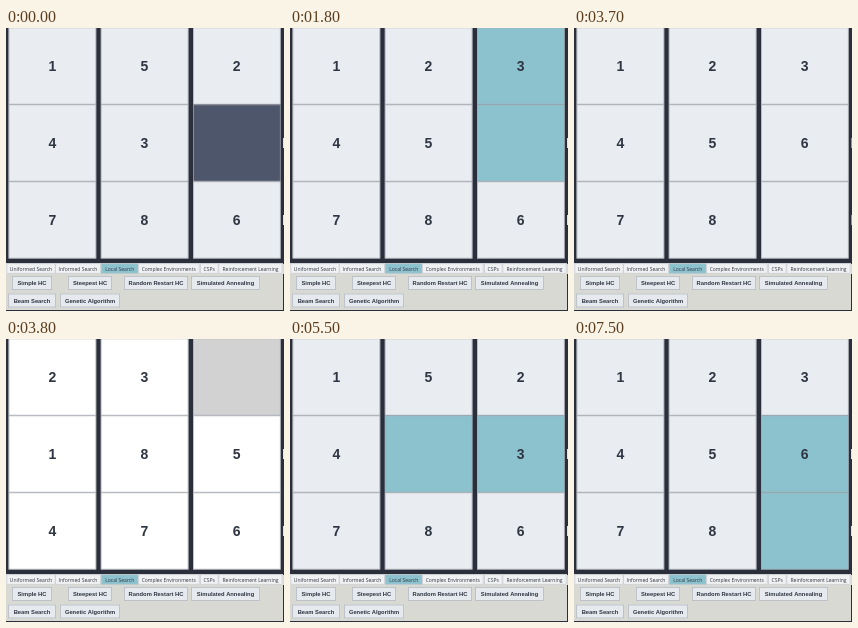
Animation, 278 px wide and 283 px high, one loop 8000 ms. Source, as an HTML page with a canvas:

```html
<!DOCTYPE html>
<html>
<head>
<meta charset="utf-8">
<style>
html, body { margin: 0; overflow: hidden; background: #d9d9d4; }
canvas { display: block; }
</style>
</head>
<body>
<canvas id="stage" width="278" height="283"></canvas>
<script>
const ctx = document.getElementById('stage').getContext('2d');
const LOOP = 8000;
const INK = '#2f3542', LIGHT = '#e9ecf1', TEAL = '#8cc2ce', DARK = '#4d566a', EDGE = '#2b2f3b';
const PANEL = '#d9d9d4';

// Each step: start time, tiles row by row (0 is the gap), gap colour, highlighted cells, tile colour.
const steps = [
  [0,    '152430786', DARK],
  [100,  '152403786', TEAL, [4, 5]],
  [700,  '102453786', TEAL, [1, 4]],
  [1300, '120453786', TEAL, [1, 2]],
  [1800, '123450786', TEAL, [2, 5]],
  [2300, '123456780', TEAL, [5, 8]],
  [2800, '123456780', LIGHT],
  [3800, '230185476', '#d2d2d2', [], '#fff'],
  [5000, '152430786', DARK],
  [5500, '152403786', TEAL, [4, 5]],
  [6000, '102453786', TEAL, [1, 4]],
  [6500, '120453786', TEAL, [1, 2]],
  [7000, '123450786', TEAL, [2, 5]],
  [7500, '123456780', TEAL, [5, 8]]
];

// Label, left, width
const tabs = [
  ['Uniformed Search', 0.5, 49], ['Informed Search', 49, 46], ['Local Search', 95, 37.5],
  ['Complex Environments', 132, 61.5], ['CSPs', 194, 18.5], ['Reinforcement Learning', 212.5, 64]
];
// Label, left, top, width
const buttons = [
  ['Simple HC', 6, 248, 40], ['Steepest HC', 62, 248, 44],
  ['Random Restart HC', 118, 248, 64], ['Simulated Annealing', 185, 248, 69],
  ['Beam Search', 2, 265.6, 48], ['Genetic Algorithm', 54, 265.6, 60]
];

function box(x, y, w, h, fill, border, line = 1) {
  ctx.fillStyle = fill;
  ctx.fillRect(x, y, w, h);
  if (!border) return;
  ctx.strokeStyle = border;
  ctx.lineWidth = line;
  ctx.strokeRect(x + line / 2, y + line / 2, w - line, h - line);
}

function label(text, x, y, font) {
  ctx.font = font;
  ctx.fillStyle = INK;
  ctx.fillText(text, x, y);
}

function drawBoard([, tiles, gap, lit = [], base = LIGHT]) {
  box(0, 0, 278, 236, EDGE);
  [...tiles].forEach((tile, i) => {
    const x = 2.6 + i % 3 * 92.2, y = Math.floor(i / 3) * 77 - 0.5;
    const fill = tile === '0' ? gap : lit.includes(i) ? TEAL : base;
    box(x, y, 87.6, 77, fill, '#a3a8ae', 0.7);
    if (tile !== '0') label(tile, x + 43.7, y + 43.9, 'bold 14px "Liberation Sans", Arial, sans-serif');
  });
}

function drawControls(pressed) {
  box(0, 235.4, 277, 46.6, PANEL);
  box(0, 235.4, 277, 10.2, '#f0f1f3');
  for (const [text, x, w] of tabs) {
    box(x, 235.4, w, 10.2, text === 'Local Search' ? TEAL : '#f0f1f3', '#c4c6c9', 0.7);
    label(text, x + w / 2, 243, '5px "Open Sans", sans-serif');
  }
  for (const [text, x, y, w] of buttons) {
    if (pressed && text === 'Steepest HC') box(x, y, w, 13.8, TEAL, EDGE, 1.5);
    else box(x, y, w, 13.8, '#e6eaee', '#b4bac1', 0.8);
    label(text, x + w / 2, y + 9.1, 'bold 5.8px "Liberation Sans", Arial, sans-serif');
  }
  box(277, 246, 1, 37, EDGE);
  box(0, 282, 278, 1, EDGE);
}

function draw(now) {
  const t = now % LOOP;
  drawBoard(steps.findLast(step => step[0] <= t));
  const mark = t >= 3700 && t < 3800 ? '#8d998f' : '#dfe2e6';
  for (const y of [110, 187]) box(277, y, 1, 10, mark);
  drawControls(t >= 4800 && t < 5000);
  requestAnimationFrame(draw);
}

ctx.textAlign = 'center';
requestAnimationFrame(draw);
</script>
</body>
</html>
```
